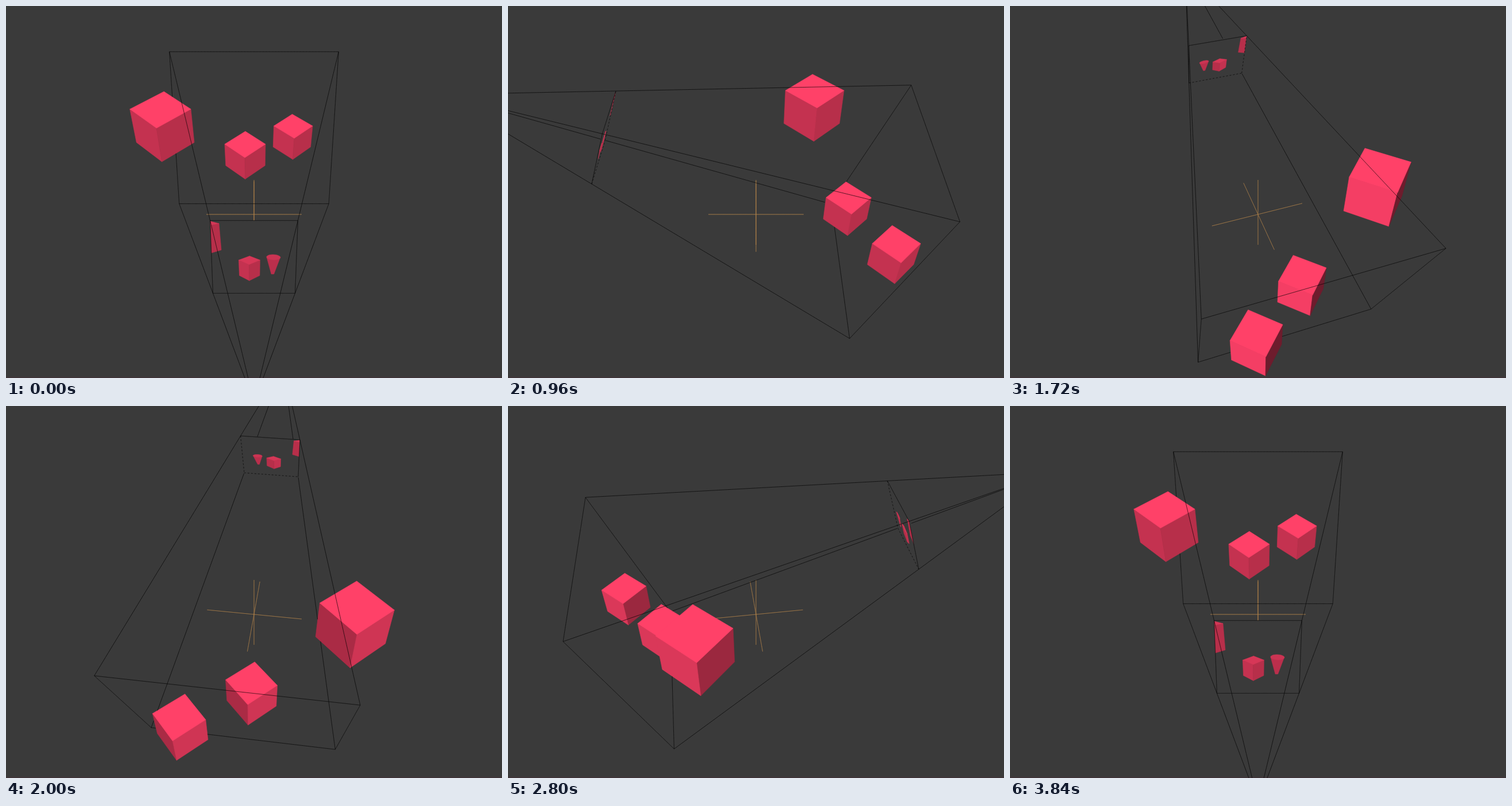
Recreate the animation shown at these times as an HTML page with a canvas. Size 864 px wide and 648 px high, loop 3880 ms.

```html
<!DOCTYPE html>
<html lang="en">
<head>
<meta charset="utf-8">
<title>Camera frustum turntable</title>
<style>
html, body { margin: 0; width: 100%; height: 100%; overflow: hidden; background: #3a3a3a; }
canvas { display: block; }
</style>
</head>
<body>
<canvas id="stage" width="864" height="648"></canvas>
<script>
const ctx = document.getElementById('stage').getContext('2d');
const BG = '#3a3a3a', WIRE = 'rgba(0, 0, 0, 0.65)', EMPTY = '#b0824a';
const FOCAL = 945, H = Math.SQRT1_2, RAD = Math.PI / 180;
const STEP = 40, STEPS = 97, TURN = 360 / 96;

// World units: distance from the viewer to the pivot is 1. x right, y away, z up.
const add = (p, q, k = 1) => p.map((v, i) => v + q[i] * k);
const sub = (p, q) => add(p, q, -1);
const mix = (p, q, t) => add(p, sub(q, p), t);
const dot = (p, q) => p[0] * q[0] + p[1] * q[1] + p[2] * q[2];

// The scene camera looks 20 degrees down with a square view
const TILT = 20.1 * RAD, REACH = 0.7435, HALF = 0.169, NEAR = 0.3232;
const apex = [0, -0.47, 0.265];
const ahead = [0, Math.cos(TILT), -Math.sin(TILT)];
const up = [0, Math.sin(TILT), Math.cos(TILT)];
const right = [1, 0, 0];
const inView = (u, v, depth) => {
  const k = depth * HALF;
  return add(add(add(apex, ahead, depth * REACH), right, u * k), up, v * k);
};
const SQUARE = [[-1, 1], [1, 1], [1, -1], [-1, -1]];
const far = SQUARE.map(([u, v]) => inView(u, v, 1));
const near = SQUARE.map(([u, v]) => inView(u, v, NEAR));

// Cubes are turned 45 degrees about z
const toLocal = ([x, y, z]) => [(x + y) * H, (y - x) * H, z];
const toWorld = ([p, q, z]) => [(p - q) * H, (p + q) * H, z];
const cube = (x, y, top, half) => ({ mid: [x, y, top - half], half });
const big = cube(-0.1666, 0.1089, 0.158, 0.0384);
const middle = cube(-0.0181, 0.1699, 0.0259, 0.0293);
const last = cube(0.0837, 0.2405, 0.0172, 0.0293);
const cubes = [big, middle, last];

let sin, cos, eye;

function setView(angle) {
  sin = Math.sin(angle);
  cos = Math.cos(angle);
  eye = [0.6779 * sin, -0.6779 * cos, 0.7363];
}

function project([x, y, z]) {
  const vx = x * cos + y * sin, vy = y * cos - x * sin;
  const k = FOCAL / (1 + H * (vy - z));
  return [432 + vx * k, 324 + (0.04127 - H * (vy + z)) * k];
}

// Where a point shows on the near plane, whose picture is a little tall
function toPicture(p) {
  const rel = sub(p, apex), k = REACH / (HALF * dot(rel, ahead));
  return inView(dot(rel, right) * k * 0.94, dot(rel, up) * k * 1.26 - 0.018, NEAR);
}

function behindCube(p, { mid, half }) {
  const a = toLocal(sub(eye, mid)), b = toLocal(sub(p, mid));
  let t0 = 0, t1 = 0.998;
  for (let i = 0; i < 3; i++) {
    const d = b[i] - a[i] || 1e-9;
    const s = (-half - a[i]) / d, e = (half - a[i]) / d;
    t0 = Math.max(t0, Math.min(s, e));
    t1 = Math.min(t1, Math.max(s, e));
  }
  return t0 < t1;
}

function behindPlane(p) {
  const center = inView(0, 0, NEAR);
  const t = dot(sub(center, eye), ahead) / dot(sub(p, eye), ahead);
  if (!(t > 0 && t < 0.998)) return false;
  const rel = sub(mix(eye, p, t), center), edge = HALF * NEAR;
  return Math.abs(dot(rel, right)) < edge && Math.abs(dot(rel, up)) < edge;
}

const hidden = p => behindPlane(p) || cubes.some(c => behindCube(p, c));

function line(p, q, color, dash = []) {
  const n = 240;
  let open = false;
  ctx.strokeStyle = color;
  ctx.lineWidth = 1;
  ctx.setLineDash(dash);
  ctx.beginPath();
  for (let i = 0; i <= n; i++) {
    const at = mix(p, q, i / n), seen = !hidden(at);
    if (seen) ctx[open ? 'lineTo' : 'moveTo'](...project(at));
    open = seen;
  }
  ctx.stroke();
  ctx.setLineDash([]);
}

function trace(points) {
  ctx.beginPath();
  points.forEach(p => ctx.lineTo(...project(p)));
  ctx.closePath();
}

function fill(points, color) {
  ctx.fillStyle = ctx.strokeStyle = color;
  ctx.lineWidth = 0.6;
  trace(points);
  ctx.fill();
  ctx.stroke();
}

const pink = lit => `rgb(${[255, 65, 104].map(v => Math.round(v * lit))})`;

// The lamp stands two degrees left of whoever looks
function light(n, from) {
  if (n[2] > 0) return 1;
  const turn = Math.atan2(from[0], -from[1]) - 2 * RAD;
  return Math.min(1, Math.max(0, 1.05 * (n[0] * Math.sin(turn) - n[1] * Math.cos(turn))));
}

function drawCube({ mid, half }, from, place, limit) {
  for (let axis = 0; axis < 3; axis++) for (const side of [-1, 1]) {
    const point = (a, b) => {
      const c = [];
      c[axis] = side;
      c[(axis + 1) % 3] = a;
      c[(axis + 2) % 3] = b;
      return toWorld(c);
    };
    const n = point(0, 0);
    if (dot(n, sub(from, add(mid, n, half))) <= 0) continue;
    const face = SQUARE.map(([a, b]) => place(add(mid, point(a, b), half)));
    fill(face, pink(Math.min(limit, light(n, from))));
  }
}

function drawCone({ mid, half }) {
  const rim = Array.from({ length: 24 }, (_, i) => {
    const a = i * 15 * RAD;
    return toPicture(add(mid, [Math.cos(a), Math.sin(a), 0.8], half));
  });
  const tip = [-0.2, 0.2].map(x => toPicture(add(mid, [x, 0, -1.6], half)));
  fill([rim[0], rim[12], ...tip], pink(0.73));
  fill(rim, pink(0.8));
}

function drawPlane() {
  fill(near, BG);
  ctx.save();
  trace(near);
  ctx.clip();
  drawCube(big, apex, toPicture, 0.84);
  drawCube(middle, apex, toPicture, 0.84);
  drawCone(last);
  ctx.restore();
}

function draw(step) {
  setView(step * TURN * RAD);
  ctx.fillStyle = BG;
  ctx.fillRect(0, 0, 864, 648);
  ctx.fillStyle = '#3f3438';
  ctx.fillRect(0, 646, 864, 2);

  const dist = p => Math.hypot(...sub(p, eye));
  const solids = cubes.map(c => ({ d: dist(c.mid), paint: () => drawCube(c, eye, p => p, 1) }));
  solids.push({ d: dist(inView(0, 0, NEAR)), paint: drawPlane });
  solids.sort((a, b) => b.d - a.d).forEach(s => s.paint());

  for (let i = 0; i < 3; i++) {
    const end = [0, 0, 0];
    end[i] = 0.0878;
    line(end, end.map(v => -v), EMPTY);
  }

  // Bottom and rear edges of the near plane break up when seen from the side
  const broken = cos > 0.94 ? [] : [2, sin > 0 ? 3 : 1];
  for (let i = 0; i < 4; i++) {
    const j = (i + 1) % 4;
    line(far[i], far[j], WIRE);
    line(apex, far[i], WIRE);
    line(near[i], near[j], WIRE, broken.includes(i) ? [3, 3] : []);
  }
}

let shown = -1;
function tick() {
  const step = Math.floor(performance.now() / STEP) % STEPS;
  if (step !== shown) draw(shown = step);
  requestAnimationFrame(tick);
}
tick();
</script>
</body>
</html>
```
